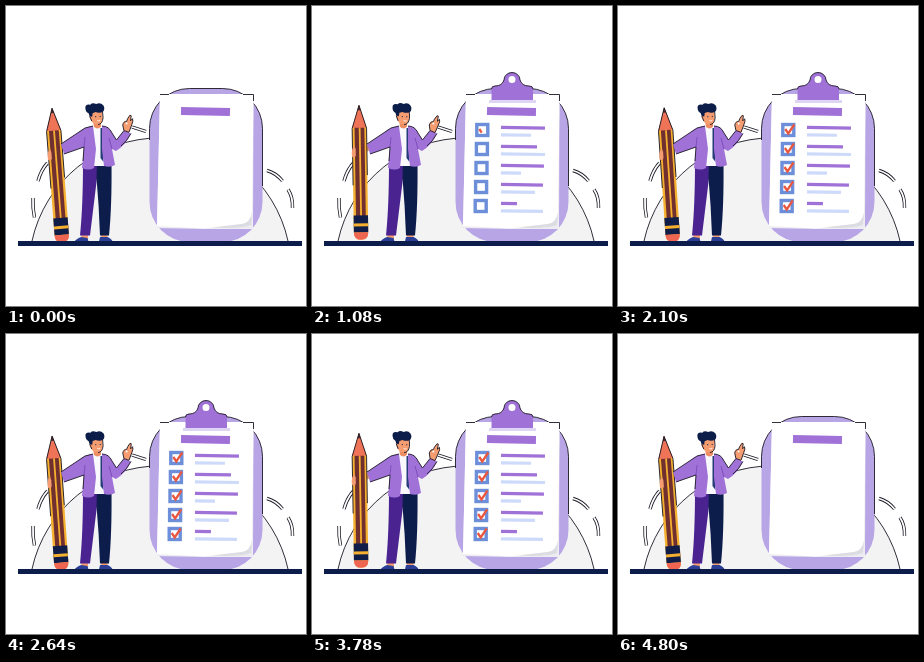
Recreate the animation shown at these times as an HTML page. Size 300 by 300 pixels, loop 4840 ms.

```html
<!DOCTYPE html>
<html lang="en">
<head>
<meta charset="utf-8">
<title>Checklist</title>
<style>
  html, body { margin: 0; width: 100%; height: 100%; overflow: hidden; background: #fff; }
  svg { display: block; width: 100vw; height: 100vh; }
  .ink { stroke: #1b1824; stroke-width: .9; }
</style>
</head>
<body>
<svg viewBox="0 0 300 300" fill="none">
  <!-- backdrop -->
  <path d="M26 235A131 131 0 0 1 282 235Z" fill="#f3f3f4"/>
  <path class="ink" d="M26 235A131 131 0 0 1 282 235"/>
  <g id="dashes"></g>

  <!-- clipboard -->
  <rect x="143.500" y="82.500" width="113" height="153.500" rx="40" fill="#b8a5e6"/>
  <path class="ink" d="M143.500 134V122.500A40 40 0 0 1 183.500 82.500H216.500A40 40 0 0 1 256.500 122.500V180"/>
  <path d="M154 88H247.500L247 223H200L151 222Z" fill="#ececf1"/>
  <path d="M154 88H247.500L246 207Q244 217 236 218L198 222.500L151 220Z" fill="#fff"/>
  <path d="M246 207Q244 217 236 218L206 221.500Q236 223 245 219Z" fill="#dcdce3"/>
  <path class="ink" d="M154 88.500H163M237 88.500H247.500V95"/>
  <rect x="175" y="101.500" width="49" height="8" fill="#a072d8" transform="rotate(1.2 200 105)"/>
  <g id="clip">
    <path d="M177 94H224V97H177Z" fill="#ded5f4"/>
    <path fill-rule="evenodd" fill="#a072d8" d="M179.500 94V83Q179.500 80 183 80Q190 80 192 74A8 7.500 0 0 1 208 74Q210 80 217 80Q221 80 221 83V94ZM196.500 73.500A3.500 3.500 0 1 0 203.500 73.500A3.500 3.500 0 1 0 196.500 73.500Z"/>
    <path class="ink" d="M179.500 83Q179.500 80 183 80Q190 80 192 74A8 7.500 0 0 1 208 74Q210 80 217 80Q221 80 221 83"/>
  </g>
  <g id="rows"></g>

  <!-- arm and pencil -->
  <path d="M58 141L44 147" stroke="#f59d70" stroke-width="6"/>
  <g id="pencil">
    <path d="M0 0L-7.200 23V126Q-7.200 134.500 0 134.500T7.200 126V23Z" fill="#f6b02f"/>
    <path d="M0 0L-7.200 22Q0 24 7.200 22Z" fill="#ee7357"/>
    <path d="M0 0L-1.500 5H1.500Z" fill="#4b2630"/>
    <path d="M-4.800 22.500H-.600V111H-4.800ZM1.200 22.500H5V111H1.200Z" fill="#70302f"/>
    <path d="M-7.200 110H7.200V127H-7.200Z" fill="#101d48"/>
    <path d="M-7.200 118H7.200V121H-7.200Z" fill="#f6b02f"/>
    <path d="M-7.200 127H7.200Q7.200 134.500 0 134.500T-7.200 127Z" fill="#ee6652"/>
    <path class="ink" d="M-7.200 80V23L0 0L7.200 23V70"/>
    <path d="M-5 41Q-8.500 42 -8 51Q-5 54 -4 50L-4 44Z" fill="#f59d70"/>
  </g>

  <!-- man -->
  <path d="M75.500 228H82V233H75ZM95 228H101.500V233H95Z" fill="#f59d70"/>
  <path d="M77 156H94L91 172L84 229.500H74Q77 200 77 156Z" fill="#4a2391"/>
  <path d="M91 156H105.500Q106 200 103 229.500H94Q93 200 90.500 172Z" fill="#0c1d4c"/>
  <path d="M75 231L81.500 232L82.500 235.500H68.500Q70 233 75 231ZM94 231H101.500Q106 233 106.500 235.500H93Z" fill="#2b3f96"/>
  <path d="M87 120L97 119L99 160H88Z" fill="#f8f8fd"/>
  <path d="M94.500 122L96 122L97.500 156L94.500 152Z" fill="#263c79"/>
  <path d="M87 114H95V120.500Q92 124 88 121Z" fill="#ee8d62"/>
  <path d="M87 120Q78 121 73 126L55 138L58 148L78 141L76 162Q83 165 88 162L90 143Z" fill="#a072d8"/>
  <path d="M96 120Q103 120 106 127L110.500 134L118 124.500L125 127.500Q119 140 110 145L106 143L109 159Q104 162 98 160L96 143Z" fill="#a072d8"/>
  <path d="M78 141L79 131M106 143L103 132" stroke="#7546b4" stroke-width=".8"/>
  <path class="ink" d="M55 138L73 126Q78 121 87 120M58 148L78 141L77 155M96 120Q103 120 106 127L110.500 134L118 124.500M125 127.500Q121 135 115 140"/>
  <g id="hand">
    <path class="ink" fill="#f59d70" d="M118 124.500L117 119Q118 115 121 115.500L122 113L124.500 109.500Q126.500 109 125.500 112L125 115L127 113Q128 115 126 119L123 126.500Z"/>
    <circle cx="121" cy="117.500" r="1" fill="#fff"/>
  </g>
  <g id="head">
    <path d="M84 104H96.500L97 112Q96.500 118.500 92 118.500Q85.500 118 84 111Z" fill="#f59d70"/>
    <path class="ink" d="M97 106L97.300 112Q96.500 118.500 92 118.500M84 110L86 115"/>
    <path d="M80 102Q79.500 97.500 85 98.500Q87 96 91 98Q95 96 98 99.500Q100 103 97.500 106Q94 107.500 90 106L87 107L86.500 110.500L84 110L83 107Q80 105.500 80 102Z" fill="#0b1d48"/>
    <path d="M90 110V111.200M94.500 110V111.200" stroke="#0b1d48" stroke-width=".9"/>
    <path d="M91.500 114.500Q93 115.500 94.500 114.500" stroke="#fff" stroke-width=".8"/>
  </g>

  <rect x="12" y="235" width="284" height="5" fill="#0c1d4c"/>
</svg>
<script>
const LOOP = 4840, CUT = 4800;
const $ = id => document.getElementById(id);
const clamp = v => Math.max(0, Math.min(1, v));
const easeOut = u => 1 - (1 - clamp(u)) ** 2;

function add(parent, tag, attrs) {
  const el = document.createElementNS('http://www.w3.org/2000/svg', tag);
  for (const key in attrs) el.setAttribute(key, attrs[key]);
  return parent.appendChild(el);
}

for (const d of ['M41.500 157Q35 164 32 175', 'M27 192Q26.500 202 28.500 211.500', 'M126 121L140 125.500',
                 'M261 164.500Q270 167 276.500 175', 'M282 183.500Q287 191 286.500 202']) {
  add($('dashes'), 'path', { d, stroke: '#1b1824', 'stroke-width': 3.4 });
  add($('dashes'), 'path', { d, stroke: '#fff', 'stroke-width': 1.8 });
}

// Widths of the two bars in each row
const rows = [[44, 30], [36, 44], [43, 20], [42, 34], [16, 42]].map((widths, i) => {
  const g = $('rows'), y = 124 + 19 * i, x = 170.300 - i * 0.4;
  const bars = widths.map((width, k) => {
    const top = y - 4.2 + 7.4 * k;
    const el = add(g, 'rect', {
      x: 189, y: top, height: 3.2, fill: ['#a072d8', '#cddafa'][k], transform: `rotate(.9 189 ${top})`
    });
    return { el, width, start: 265 + 45 * i + 40 * k };
  });
  const box = add(g, 'rect', { x: -5.5, y: -5.5, width: 11, height: 11, fill: '#fff', stroke: '#6d8fd9', 'stroke-width': 3.4 });
  const check = add(g, 'path', {
    d: `M${x - 3} ${y - 1}L${x} ${y + 3.5}L${x + 6} ${y - 5.5}`,
    stroke: '#e9573f', 'stroke-width': 2.3, pathLength: 1
  });
  return { x, y, bars, box, check, boxStart: 360 + 45 * i, checkStart: 1000 + 150 * i };
});

// Grow past full size, dip below it, then settle
function pop(ms) {
  const u = ms / 120;
  return 1.2 * clamp(u) - 0.3 * clamp(u - 1) + 0.1 * clamp(u - 2);
}

function draw(now) {
  const time = now % LOOP;
  const t = time < CUT ? time : 0;
  const sway = Math.cos(time / LOOP * 4 * Math.PI);

  const lean = -Math.atan((6.2 + 4.2 * sway) / 135) * 180 / Math.PI;
  $('pencil').setAttribute('transform', `translate(${46.5 - 0.5 * sway} ${100.7 + 1.5 * sway}) rotate(${lean})`);
  $('head').setAttribute('transform', `rotate(${-2 * sway} 91 119)`);
  $('hand').setAttribute('transform', `rotate(${-2 * sway} 118 127)`);
  $('clip').setAttribute('transform', `translate(200 95) scale(${pop(t - 60)}) translate(-200 -95)`);

  for (const { x, y, bars, box, check, boxStart, checkStart } of rows) {
    for (const { el, width, start } of bars)
      el.setAttribute('width', width * easeOut((t - start) / 500));
    box.setAttribute('transform', `translate(${x} ${y}) scale(${pop(t - boxStart)})`);
    const drawn = clamp((t - checkStart) / 300);
    check.setAttribute('stroke-dasharray', `${drawn} 2`);
    check.setAttribute('visibility', drawn ? 'visible' : 'hidden');
  }
}

const begin = performance.now();
function tick() {
  draw(performance.now() - begin);
  requestAnimationFrame(tick);
}
tick();
</script>
</body>
</html>
```
